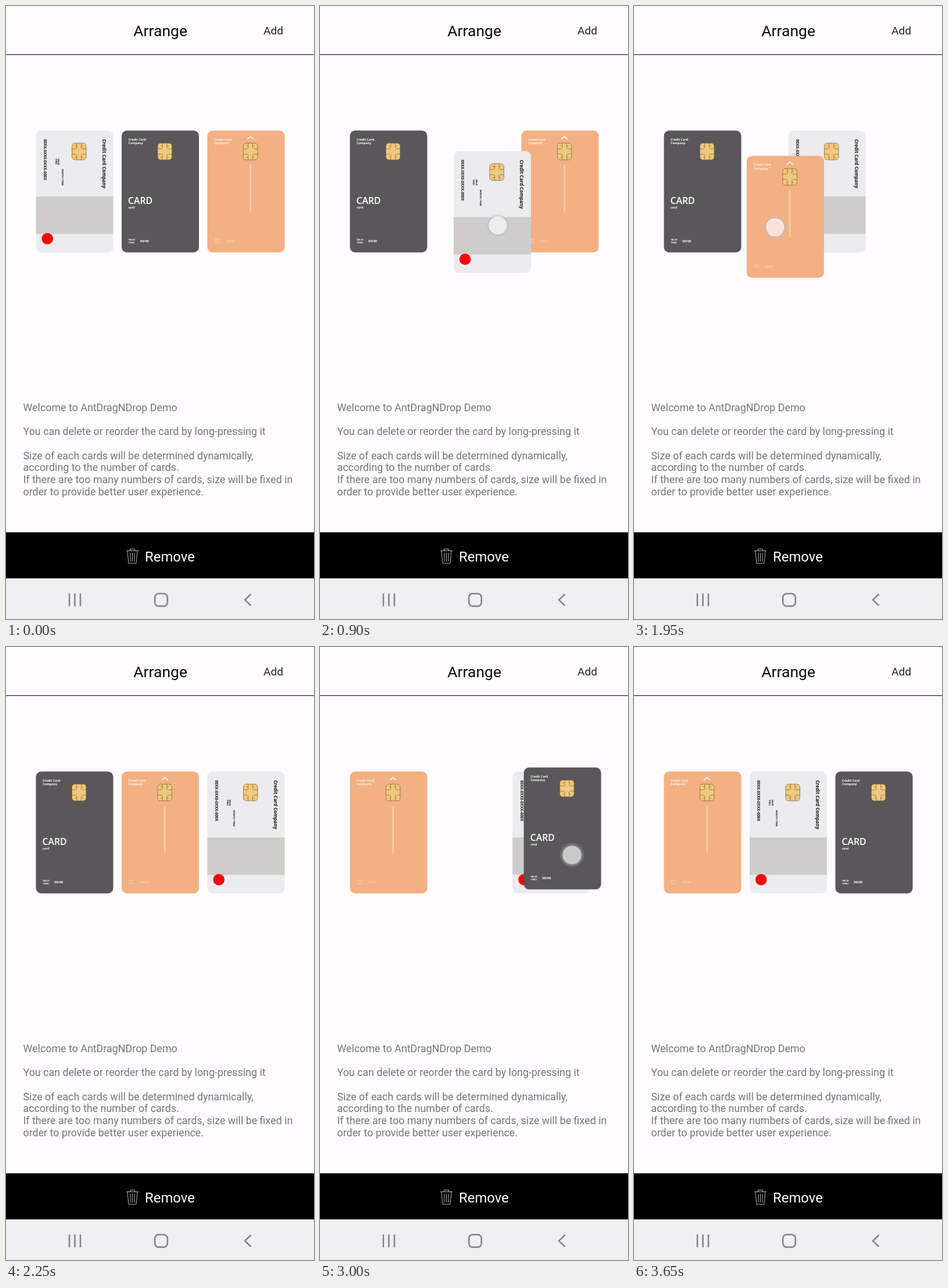
Recreate the animation shown at these times as an HTML page with a canvas. Size 530 by 1056 pixels, loop 3700 ms.

```html
<!DOCTYPE html>
<html lang="en">
<head>
<meta charset="utf-8">
<title>Arrange</title>
<style>
  html, body { margin: 0; width: 100%; height: 100%; overflow: hidden; background: #fefcfe; }
  canvas { display: block; width: 530px; height: 1056px; }
</style>
</head>
<body>
<canvas id="stage" width="530" height="1056"></canvas>
<script>
const ctx = document.getElementById('stage').getContext('2d');
const LOOP = 3700, SWAP_MS = 130, SETTLE_MS = 150, LEAD_MS = 30;
const CARD_W = 133, CARD_H = 210, TOP = 214.5;
const UI = 'Roboto, sans-serif', PRINT = '"Open Sans", sans-serif';
const slotX = slot => 51.5 + slot * 147.5;

// keys: [time, card x, card y]; grip: touch point inside the card
const drags = [
  { card: 'white', to: 1, down: 50, release: 900, grip: [76, 128],
    keys: [[280, 51.5, 214.5], [400, 95, 240], [550, 196.5, 291], [720, 262, 280], [900, 230, 250]] },
  { card: 'orange', to: 1, down: 1150, release: 2100, grip: [53, 132],
    keys: [[1380, 346.5, 214.5], [1565, 358.2, 271.5], [1650, 284, 300], [1800, 225, 290],
           [1890, 199, 275], [1950, 194, 258.5], [2050, 182.5, 232], [2100, 183, 228]] },
  { card: 'dark', to: 2, down: 2400, release: 3480, grip: [79, 151],
    keys: [[2530, 51.5, 214.5], [2650, 199.6, 215.2], [2720, 290, 211], [2800, 330, 207],
           [2900, 345, 206.5], [3000, 350.6, 207.6], [3200, 384, 205], [3480, 374, 209]] }
];
// every neighbour that steps aside: [card, start, from slot, to slot]
const shifts = [
  ['dark', 560, 1, 0], ['white', 1890, 1, 2], ['orange', 2650, 1, 0], ['white', 2974, 2, 1]
];

const clamp = v => Math.max(0, Math.min(1, v));
const mix = (a, b, p) => a + (b - a) * p;
const easeInOut = p => (1 - Math.cos(Math.PI * clamp(p))) / 2;
const easeCubic = u => u * u * (3 - 2 * u);

// Monotone cubic through the keys, so no overshoot between them
function sample(keys, t, axis) {
  const last = keys.length - 1;
  if (t <= keys[0][0]) return keys[0][axis];
  if (t >= keys[last][0]) return keys[last][axis];
  const slope = i => (keys[i + 1][axis] - keys[i][axis]) / (keys[i + 1][0] - keys[i][0]);
  const tangent = i => {
    if (i === 0 || i === last) return 0;
    const a = slope(i - 1), b = slope(i);
    return a * b <= 0 ? 0 : 2 * a * b / (a + b);
  };
  let i = 0;
  while (t > keys[i + 1][0]) i++;
  const h = keys[i + 1][0] - keys[i][0], u = (t - keys[i][0]) / h;
  return mix(keys[i][axis], keys[i + 1][axis], easeCubic(u)) +
    h * (tangent(i) * u * (1 - u) ** 2 - tangent(i + 1) * u * u * (1 - u));
}

function box(x, y, w, h, r) {
  ctx.beginPath();
  ctx.roundRect(x, y, w, h, r);
}

function disc(x, y, r, fill) {
  ctx.fillStyle = fill;
  ctx.beginPath();
  ctx.arc(x, y, r, 0, Math.PI * 2);
  ctx.fill();
}

function line(color, width, ...points) {
  ctx.strokeStyle = color;
  ctx.lineWidth = width;
  ctx.beginPath();
  points.forEach(([x, y]) => ctx.lineTo(x, y));
  ctx.stroke();
}

function text(str, x, y, size, color, family = UI, weight = 400) {
  ctx.font = `${weight} ${size}px ${family}`;
  ctx.fillStyle = color;
  ctx.fillText(str, x, y);
}

// Text reading downwards, its baseline on the left
function sideText(str, x, y, size, weight = 700) {
  ctx.save();
  ctx.translate(x, y);
  ctx.rotate(Math.PI / 2);
  text(str, 0, 0, size, '#111', PRINT, weight);
  ctx.restore();
}

function chip() {
  ctx.save();
  ctx.translate(62, 21.7);
  box(0, 0, 24.4, 28.8, 5);
  ctx.fillStyle = '#f1c97d';
  ctx.fill();
  ctx.strokeStyle = '#84683a';
  ctx.lineWidth = 0.8;
  ctx.stroke();
  ctx.beginPath();
  for (const sx of [1, -1]) {
    for (const sy of [1, -1]) {
      const px = x => 12.2 + sx * x, py = y => 14.4 + sy * y;
      ctx.moveTo(px(12.2), py(4.5));
      ctx.lineTo(px(7), py(4.5));
      ctx.bezierCurveTo(px(2.5), py(4.5), px(2.5), py(10), px(7), py(10));
      ctx.moveTo(px(4), py(8.5));
      ctx.lineTo(px(4), py(14.4));
    }
  }
  ctx.stroke();
  ctx.restore();
}

function frontPrint(color, faint, weight) {
  text('Credit Card', 11.5, 17, 5.4, color, PRINT, 700);
  text('Company', 11.5, 23.7, 5.4, color, PRINT, 700);
  text('VALID', 11.7, 189.5, 3.9, faint, PRINT, weight);
  text('THRU', 11.7, 194, 3.9, faint, PRINT, weight);
  text('00/00', 31.7, 192.5, 5.6, faint, PRINT, weight);
}

const faces = {
  white() {
    ctx.fillStyle = '#cecdcb';
    ctx.fillRect(0, 113.7, CARD_W, 64.3);
    sideText('00XX-0XX0-0XXX-000X', 13.2, 15, 6.5);
    sideText('Credit Card Company', 114.2, 15, 8);
    sideText('VALID', 37.6, 48.5, 3.7);
    sideText('THRU', 33.2, 48.5, 3.7);
    sideText('MONTH / YEAR', 44.6, 66.5, 3.8);
    disc(19.7, 186.3, 9.8, '#fe0000');
  },
  dark() {
    frontPrint('#fff', '#fff', 700);
    text('CARD', 11, 126.2, 15.8, '#fff', PRINT, 600);
    text('card', 11.5, 134.6, 5.1, '#fff', PRINT, 700);
  },
  orange() {
    frontPrint('#fff5ec', '#fbe0cc', 400);
    line('#fff', 1.6, [68.8, 15], [74.2, 10.2], [79.6, 15]);
    line('#f8ceae', 2.6, [74.2, 59.5], [74.2, 140]);
  }
};
const cardFill = { white: '#ecebed', dark: '#595759', orange: '#f3b083' };

function drawCard(name, x, y) {
  ctx.save();
  ctx.translate(x, y);
  box(0, 0, CARD_W, CARD_H, 9);
  ctx.fillStyle = cardFill[name];
  ctx.fill();
  faces[name]();
  chip();
  ctx.restore();
}

function drawTouch(x, y, alpha) {
  ctx.save();
  ctx.globalAlpha = alpha;
  const halo = ctx.createRadialGradient(x, y, 14.5, x, y, 22);
  halo.addColorStop(0, 'rgba(176,174,200,0)');
  halo.addColorStop(0.2, 'rgba(176,174,200,.6)');
  halo.addColorStop(0.36, 'rgba(180,178,204,.45)');
  halo.addColorStop(0.6, 'rgba(200,197,220,.2)');
  halo.addColorStop(1, 'rgba(215,212,230,0)');
  disc(x, y, 22, halo);
  disc(x, y, 15.8, 'rgba(250,250,251,.7)');
  ctx.restore();
}

function drawScreen() {
  ctx.fillStyle = '#fefcfe';
  ctx.fillRect(0, 0, 530, 1056);
  text('Arrange', 219.3, 52, 26.5, '#0a0a0a');
  text('Add', 443, 48.6, 19.1, '#222');
  ctx.fillStyle = '#2b2a2b';
  ctx.fillRect(0, 83, 530, 1.3);

  const lines = ['Welcome to AntDragNDrop Demo', '', 'You can delete or reorder the card by long-pressing it', '',
    'Size of each cards will be determined dynamically,', 'according to the number of cards.',
    'If there are too many numbers of cards, size will be fixed in', 'order to provide better user experience.'];
  lines.forEach((str, i) => text(str, 29.5, 698 + i * 20.68, 17.86, '#767577'));

  ctx.fillStyle = '#000';
  ctx.fillRect(0, 906.6, 530, 79.4);
  text('Remove', 239, 956.8, 23.9, '#fff');
  drawTrash();

  ctx.fillStyle = '#f0eff1';
  ctx.fillRect(0, 986, 530, 70);
  const nav = '#858487';
  for (const x of [109, 118.5, 128]) line(nav, 2.6, [x, 1012], [x, 1034]);
  box(256.2, 1012.3, 21.6, 21.6, 6.5);
  ctx.stroke();
  line(nav, 2.5, [421.5, 1013], [411, 1023], [421.5, 1033]);
}

function drawTrash() {
  const gray = '#b5b5b5';
  line(gray, 1, [207, 938.5], [228, 938.5]);
  line(gray, 1, [213.5, 938.5], [213.5, 935.5], [221.5, 935.5], [221.5, 938.5]);
  line(gray, 1, [209, 939], [211, 960], [224, 960], [226, 939]);
  for (const x of [214, 217.5, 221]) line(gray, 1, [x, 942], [x, 957]);
}

function draw(t) {
  drawScreen();
  const place = {
    dark: [slotX(1), TOP], white: [slotX(0), TOP], orange: [slotX(2), TOP]
  };
  let held = null, touch = null;

  const events = [
    ...drags.map(d => ({ at: d.keys[0][0], drag: d })),
    ...shifts.map(s => ({ at: s[1], shift: s }))
  ].sort((a, b) => a.at - b.at);

  for (const { at, drag, shift } of events) {
    if (t < at) continue;
    if (shift) {
      const [card, start, from, to] = shift;
      place[card] = [mix(slotX(from), slotX(to), easeInOut((t - start) / SWAP_MS)), TOP];
    } else {
      const back = easeInOut((t - drag.release) / SETTLE_MS);
      place[drag.card] = [
        mix(sample(drag.keys, t, 1), slotX(drag.to), back),
        mix(sample(drag.keys, t, 2), TOP, back)
      ];
      if (t < drag.release + SETTLE_MS) held = drag.card;
    }
  }

  for (const d of drags) {
    const alpha = Math.min(clamp((t - d.down + 40) / 80), clamp(1 - (t - d.release) / 80));
    if (t >= d.down && alpha > 0) {
      touch = [sample(d.keys, t + LEAD_MS, 1) + d.grip[0], sample(d.keys, t + LEAD_MS, 2) + d.grip[1], alpha];
    }
  }

  for (const name in place) if (name !== held) drawCard(name, ...place[name]);
  if (held) drawCard(held, ...place[held]);
  if (touch) drawTouch(...touch);
}

const start = performance.now();
function tick() {
  draw((performance.now() - start) % LOOP);
  requestAnimationFrame(tick);
}
tick();
</script>
</body>
</html>
```
